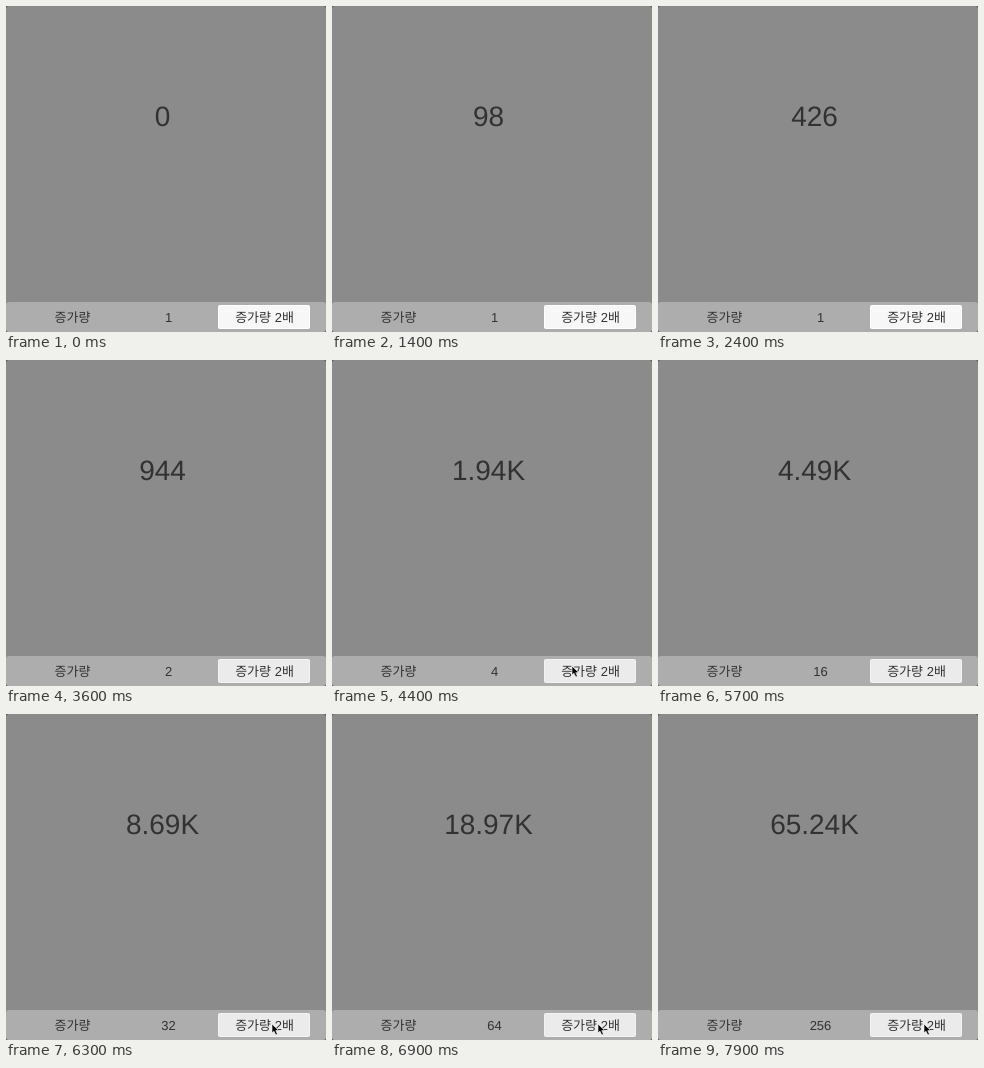
Animation of 320x326 px, one loop 8000 ms. Source, as an HTML page:

```html
<!DOCTYPE html>
<html lang="ko">
<head>
<meta charset="utf-8">
<style>
  html, body { margin: 0; height: 100%; overflow: hidden; background: #555; }
  svg { display: block; width: 320px; height: 326px; }
  text {
    font: 13px "Liberation Sans", Arial, "Noto Sans CJK KR", "Noto Sans CJK", sans-serif;
    text-anchor: middle;
    text-rendering: geometricPrecision;
    fill: #323232;
  }
  #total { font-size: 28px; }
</style>
</head>
<body>
<svg viewBox="0 0 320 326">
  <rect width="320" height="326" rx="3" fill="#8b8b8b"/>
  <rect y="296" width="320" height="30" rx="3" fill="#adadad"/>
  <text id="total" x="156.5" y="120.3"></text>
  <text x="66.5" y="315.5">증가량</text>
  <text id="step" x="162.5" y="315.5"></text>
  <rect id="button" x="212.5" y="299.5" width="91" height="23" rx="1"/>
  <text x="258.5" y="315.5">증가량 2배</text>
  <path id="cursor" d="M0 0V9L2 7.2L3.8 11L5.4 10.2L3.8 6.6H6.6Z" stroke="#fff" stroke-width=".6"/>
</svg>
<script>
const LOOP = 8000, FRAME = 100;
const RATE = 328, START = 1.1;   // gain per second at step 1
const HOVER = 3.1;
const clicks = [3.22, 3.68, 5.26, 5.6, 6.1, 6.52, 7.2, 7.648];
const $ = id => document.getElementById(id);

// Each click doubles the step, so click i adds 2^i to the slope.
function totalAt(t) {
  if (t < 0.6) return 0;
  if (t < 1.2) return 1;
  return RATE * clicks.reduce(
    (sum, click, i) => sum + 2 ** i * Math.max(0, t - click), t - START);
}

const format = n => n < 1000 ? String(Math.floor(n)) : (n / 1000).toFixed(2) + "K";

function cursorAt(t) {
  if (t >= 3.8 && t < 5.2) return [240, 306];
  if (t >= 5.9) return [266, 310];
  return null;
}

function draw(t) {
  $("total").textContent = format(totalAt(t));
  $("step").textContent = 2 ** clicks.filter(click => click <= t).length;

  const pressed = clicks.some(click => Math.abs(t - click) < 0.05);
  const [fill, edge] = pressed ? ["#c6c6c6", "#cecece"]
    : t >= HOVER ? ["#ebebeb", "#f3f3f3"] : ["#f7f7f7", "#ffffff"];
  $("button").setAttribute("fill", fill);
  $("button").setAttribute("stroke", edge);

  const tip = cursorAt(t);
  $("cursor").setAttribute("visibility", tip ? "visible" : "hidden");
  if (tip) $("cursor").setAttribute("transform", `translate(${tip})`);
}

function tick() {
  draw(Math.floor(performance.now() % LOOP / FRAME) * FRAME / 1000);
  requestAnimationFrame(tick);
}
tick();
</script>
</body>
</html>
```
